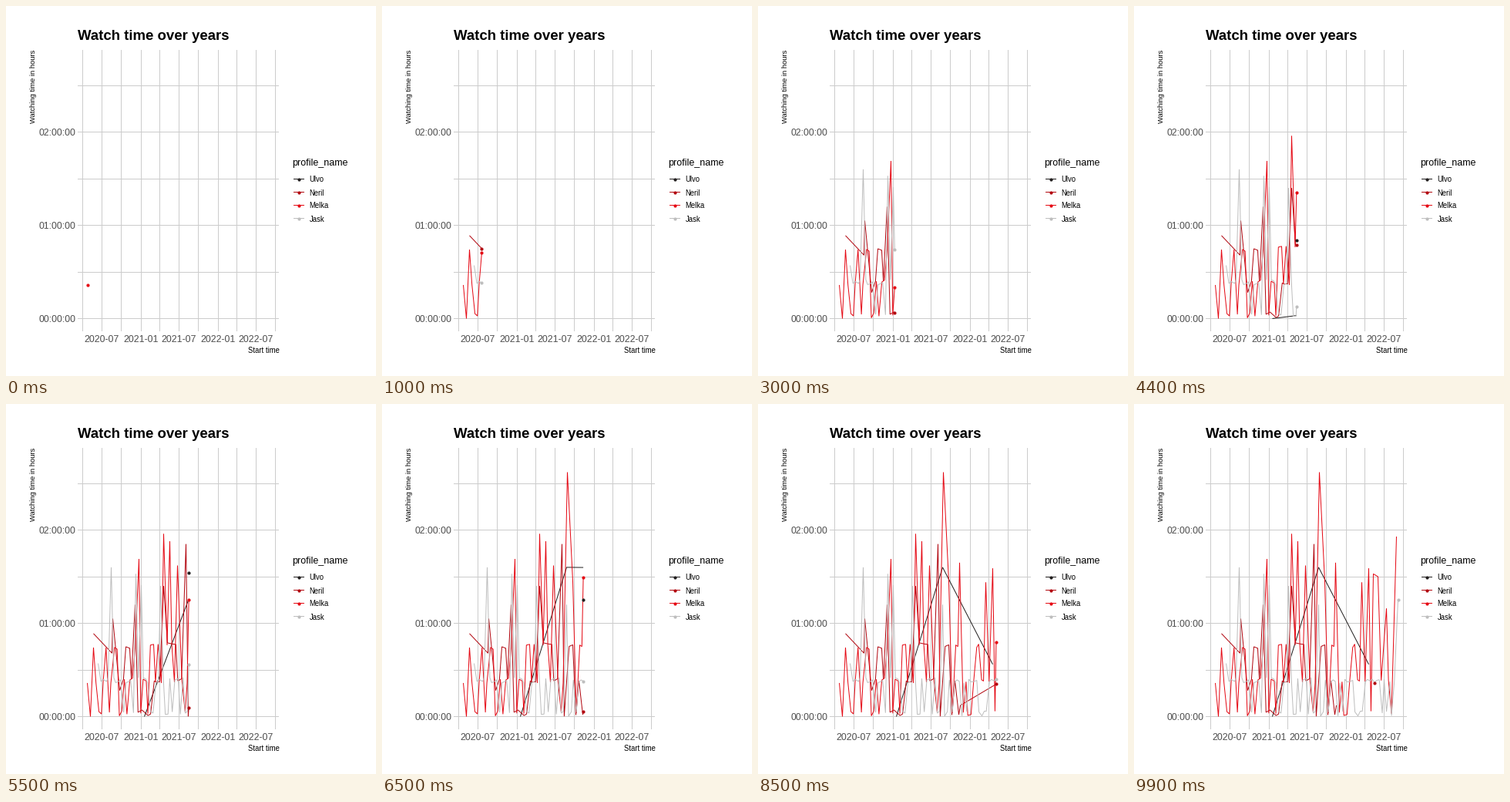
These frames come from a looping animation (480 px wide and 480 px high, 10 s). A matplotlib script:

```python
import numpy as np
import matplotlib.pyplot as plt
from matplotlib.animation import FuncAnimation

FRAMES = 100
PX = 0.9  # points per pixel at 80 dpi
START, END = 105, 342
ZERO, HOUR = 405, 121  # row of zero hours, rows per hour
EPISODE = 0.36  # hours
GRID, TICK = "#cccccc", "#4d4d4d"
COLORS = {"Ulvo": "#221f1f", "Neril": "#b20710", "Melka": "#e50914", "Jask": "#bebebe"}
LONE = "Neril"  # its last session ends up as a dot without a line


def sessions(keys, span=(0, 0), step=3.0, counts=(0, 1, 1, 2), seed=1):
    """Key sessions {x: hours} with random runs of whole episodes between."""
    rng = np.random.default_rng(seed)
    kx = np.array(list(keys), float)
    xs = np.arange(*span, step)
    xs = xs + rng.uniform(-0.25, 0.25, len(xs)) * step
    xs = np.array([x for x in xs if abs(kx - x).min() > step * 0.6])
    hours = EPISODE * rng.choice(counts, len(xs)) + rng.uniform(0, 0.06, len(xs))
    pts = np.column_stack([np.r_[kx, xs], np.r_[list(keys.values()), hours]])
    pts[:, 1] = ZERO - HOUR * pts[:, 1]
    return pts[pts[:, 0].argsort()]


SERIES = {
    "Ulvo": sessions({179: 0, 239: 1.6, 304: 0.56}),
    "Neril": sessions({113: 0.89, 137: 0.68, 138: 1.05, 147: 0.28, 167: 1.2, 176: 0.07,
                       204: 1.4, 209: 0.79, 233: 1.85, 260: 0.02, 262: 0.12, 311: 0.36},
                      (151, 258), 4, seed=4),
    "Melka": sessions({105: 0.36, 109: 0, 113: 0.74, 172: 1.69, 204: 1.96, 212: 1.88,
                       222: 1.62, 240: 2.62, 247: 1.45, 261: 1.65, 295: 1.44, 304: 1.59,
                       310: 1.53, 316: 1.5, 327: 1.16, 340: 1.93},
                      (116, 337), 3.4, seed=7),
    "Jask": sessions({119: 0.57, 136: 1.6, 168: 1.53, 175: 1.41, 200: 1.4, 239: 1.2,
                      END: 1.25},
                     (123, 341), 3.2, (0, 1, 1), seed=2),
}

fig = plt.figure(figsize=(6, 6), dpi=80, facecolor="white")
ax = fig.add_axes([0, 0, 1, 1])
ax.set(xlim=(-0.5, 479.5), ylim=(479.5, -0.5))
ax.axis("off")


def label(x, y, s, size, color="black", **kw):
    kw = {"va": "baseline", **kw}
    ax.text(x, y, s, fontsize=size * PX, color=color, family="Liberation Sans", **kw)


def line(xs, ys, color, z=2):
    return ax.plot(xs, ys, color=color, lw=PX, snap=False, zorder=z,
                   solid_capstyle="butt", solid_joinstyle="bevel")[0]


def dot(xs, ys, color):
    return ax.plot(xs, ys, "o", ms=4.2 * PX, mew=0, color=color, snap=False, zorder=4)[0]


for x in (99, 124, 149, 175, 199, 224, 249, 275, 299, 324, 349):
    line([x, x], [56.5, 421.5], GRID, 1)
for y in (103, 163, 224, 284, 345, 405):
    line([92.5, 353.5], [y, y], GRID, 1)

label(92.5, 43.8, "Watch time over years", 18.65, weight="bold")
for hour, y in enumerate((405, 284, 163)):
    label(90, y + 4.3, f"{hour:02d}:00:00", 12.3, TICK, ha="right")
for x, s in zip((124, 175, 224, 275, 324),
                ("2020-07", "2021-01", "2021-07", "2022-01", "2022-07")):
    label(x, 435.8, s, 12.4, TICK, ha="center")
label(354, 449, "Start time", 9.5, ha="right")
label(34.5, 56, "Watching time in hours", 9.4, rotation=90, ha="center", va="top")

label(371, 207, "profile_name", 12.5)
for i, (name, color) in enumerate(COLORS.items()):
    y = 224 + 17 * i
    line([372.5, 386.5], [y, y], color)
    dot([379], [y], color)
    label(393, y + 4, name, 9.5)

lines = {n: line([], [], c) for n, c in COLORS.items()}
dots = {n: dot([], [], c) for n, c in COLORS.items()}


def reveal(pts, x, ease=1):
    """Part of the path left of x, with the tip on the running segment."""
    k = np.searchsorted(pts[:, 0], x, side="right")
    if k in (0, len(pts)):
        return pts[:k]
    a, b = pts[k - 1], pts[k]
    f = (x - a[0]) / (b[0] - a[0])
    return np.vstack([pts[:k], [x, a[1] + (b[1] - a[1]) * f ** ease]])


def update(i):
    x = START + (END - START) * i / (FRAMES - 1)
    for name, pts in SERIES.items():
        last = pts[-1, 0]
        drawn = pts[:-1] if name == LONE and x > last else pts
        # the sparse profile's line lags behind its dot
        lines[name].set_data(*reveal(drawn, x, 6 if len(pts) < 4 else 1).T)
        shown = x <= last + 1 or name == LONE
        dots[name].set_data(*reveal(pts, x)[-1 if shown else len(pts):].T)
    return [*lines.values(), *dots.values()]


anim = FuncAnimation(fig, update, frames=FRAMES, interval=100, repeat=True,
                     repeat_delay=0, blit=False)
plt.show()
```
